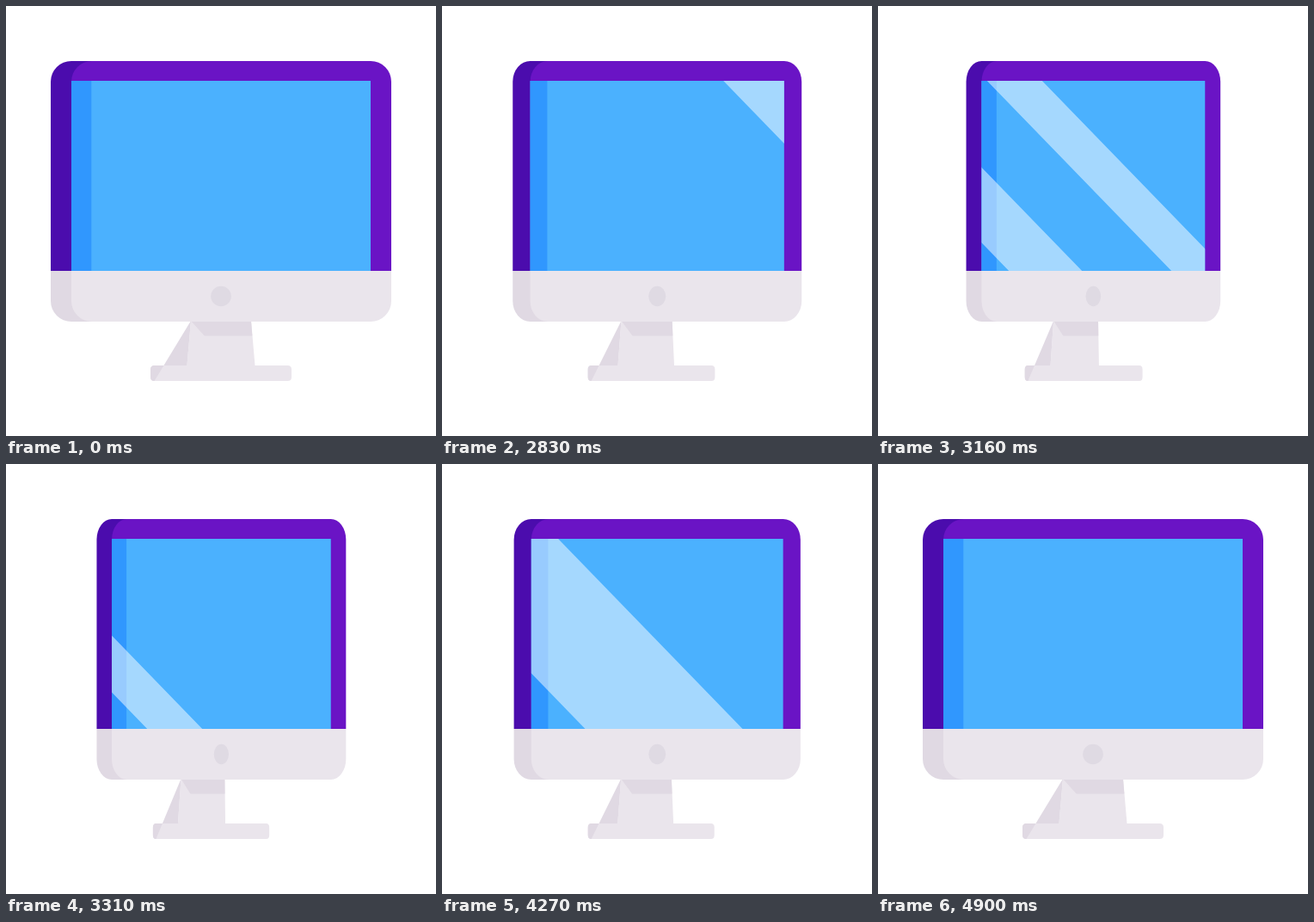
Write an HTML page that moves like this. It is 500x500 px and loops after 4930 ms.

```html
<!DOCTYPE html>
<html lang="en">
<head>
<meta charset="utf-8">
<title>Monitor</title>
<style>
  html, body { margin: 0; width: 100%; height: 100%; overflow: hidden; background: #fff; }
  svg { display: block; width: 100vw; height: 100vh; }
</style>
</head>
<body>
<svg viewBox="0 0 500 500">
  <defs>
    <clipPath id="top"><rect x="40" y="60" width="420" height="248"/></clipPath>
    <clipPath id="chin"><rect x="40" y="308" width="420" height="70"/></clipPath>
    <clipPath id="glass"><rect id="pane" y="87" height="221"/></clipPath>
  </defs>
  <path id="stand" fill="#eae5ec"/>
  <path id="shade" fill="#e0d9e3"/>
  <g id="monitor">
    <g clip-path="url(#top)">
      <rect x="52" y="64" width="200" height="303" rx="24" fill="#4b0cad"/>
      <rect x="76" y="64" width="372" height="303" rx="24" fill="#6a14c5"/>
    </g>
    <g clip-path="url(#chin)">
      <rect x="52" y="64" width="200" height="303" rx="24" fill="#e0d9e3"/>
      <rect x="76" y="64" width="372" height="303" rx="24" fill="#eae5ec"/>
    </g>
    <rect x="76" y="87" width="348" height="221" fill="#4bb1fe"/>
    <rect x="76" y="87" width="23.3" height="221" fill="#3097fe"/>
    <circle cx="250" cy="337.5" r="11.8" fill="#dfdae3"/>
  </g>
  <path id="glare" fill="#fff" fill-opacity=".5" clip-path="url(#glass)"/>
</svg>
<script>
const LOOP = 4930;
// [time in ms, amount of turn]
const TURN = [
  [2510, 0], [2660, .19], [2830, .54], [3010, .804], [3040, .836], [3310, .957], [3700, 1],
  [3850, 1], [4000, .945], [4120, .82], [4270, .568], [4460, .225], [4660, .054], [4900, 0]
];
const $ = id => document.getElementById(id);

function slope(i) {
  if (i === 0 || i === TURN.length - 1) return 0;
  const [t0, a] = TURN[i - 1], [t1, b] = TURN[i], [t2, c] = TURN[i + 1];
  const u = (b - a) / (t1 - t0), v = (c - b) / (t2 - t1);
  return u * v <= 0 ? 0 : 2 * u * v / (u + v);
}

function turnAt(t) {
  const i = TURN.findIndex(k => k[0] > t) - 1;
  if (i < 0) return 0;
  const [t0, a] = TURN[i], [t1, b] = TURN[i + 1];
  const d = t1 - t0, x = (t - t0) / d, y = 1 - x;
  return a * y * y * (1 + 2 * x) + b * x * x * (1 + 2 * y)
    + d * x * y * (slope(i) * y - slope(i + 1) * x);
}

// Diagonal band; x is its left edge at the top of the screen
const band = (x, w) => `M${x} 87h${w}l214.4 221h${-w}z`;

function glareAt(t) {
  if (t > 2600 && t < 3500) {
    const x = 116 - 1.18 * (t - 3010);
    return band(x, 85) + band(x + 189, 64);
  }
  if (t > 3950 && t < 4800) return band(-49 + 1.1 * (t - 4270), 183);
  return "";
}

function draw(t) {
  const p = turnAt(t), s = 1 - .28 * p, cx = 250 + .4 * p;
  const at = (x, dx) => x + dx * p;
  const left = at(168, 3), right = at(332, -27), r = 4.5 - p;
  const neckL = at(215, -12), neckR = at(285, -32);
  const footL = at(210.5, -11), footR = at(289.5, -36);
  const inTop = at(230.7, -17), inBottom = at(227, -16);
  const baseLeft = `L${left + r} 418Q${left} 418 ${left} 422.5V431.5Q${left} 436 ${left + r} 436`;

  $("stand").setAttribute("d", `M${neckL} 366H${neckR}L${footR} 418H${right - r}`
    + `Q${right} 418 ${right} 422.5V431.5Q${right} 436 ${right - r} 436H${left + r}`
    + `Q${left} 436 ${left} 431.5V422.5Q${left} 418 ${left + r} 418H${footL}z`);
  $("shade").setAttribute("d", `M${neckL} 366H${neckR}L${at(286.4, -33.3)} 383.5H${inTop}`
    + `L${inBottom} 436H${left + r}M${neckL} 366L${footL} 418${baseLeft}H${inBottom}L${inTop} 383.5z`);
  $("monitor").setAttribute("transform", `translate(${cx} 0) scale(${s} 1) translate(-250 0)`);
  $("pane").setAttribute("x", cx - 174 * s);
  $("pane").setAttribute("width", 348 * s);
  $("glare").setAttribute("d", glareAt(t));
}

const start = performance.now();
function tick() {
  draw((performance.now() - start) % LOOP);
  requestAnimationFrame(tick);
}
tick();
</script>
</body>
</html>
```
